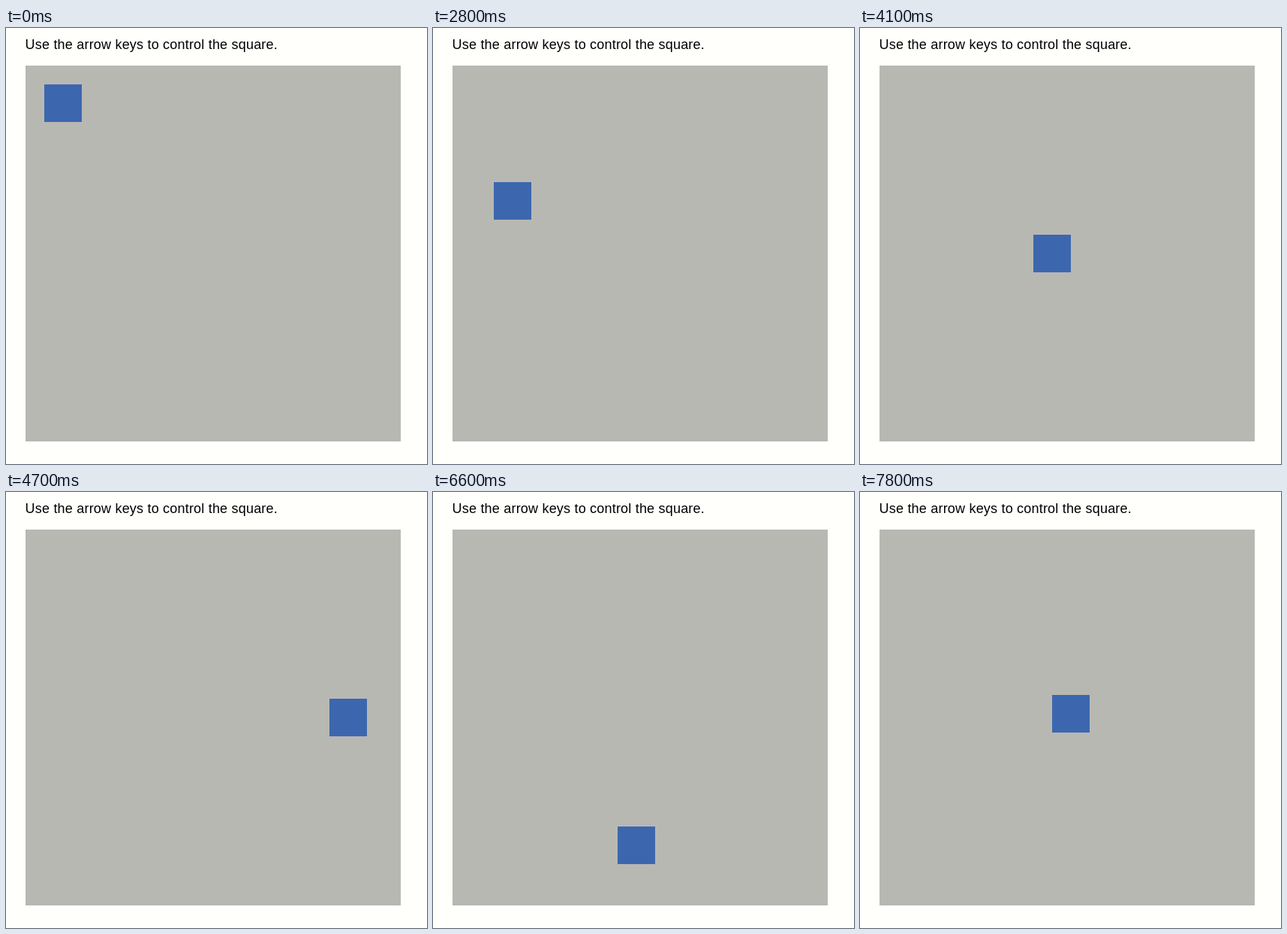
An HTML page that plays this animation: 561x580 px, repeating every 8 s.

```html
<!DOCTYPE html>
<html lang="en">
<head>
<meta charset="utf-8">
<title>Arrow key square</title>
<style>
  html, body { margin: 0; width: 100%; height: 100%; overflow: hidden; background: #fffffc; }
  svg { display: block; }
  text { font: 18px "Liberation Sans", Arial, sans-serif; letter-spacing: 0.2px; fill: #000; }
</style>
</head>
<body>
<svg width="561" height="580" viewBox="0 0 561 580">
  <text x="25.6" y="28">Use the arrow keys to control the square.</text>
  <svg x="26" y="50" width="500" height="500">
    <rect width="500" height="500" fill="#b8b8b3"/>
    <rect id="square" width="50" height="50" fill="#3c67ae"/>
  </svg>
</svg>
<script>
  const LOOP = 8000, STEP = 100;
  const square = document.getElementById("square");
  const poses = [];
  let x = 25, y = 25;

  const pose = (t) => poses.push({ t, x, y });
  const moveTo = (t, nx, ny) => { x = nx; y = ny; pose(t); };
  // One position per step along a single axis while a key is held.
  const holdX = (t, xs) => xs.forEach((v, i) => moveTo(t + i * STEP, v, y));
  const holdY = (t, ys) => ys.forEach((v, i) => moveTo(t + i * STEP, x, v));

  pose(0);
  moveTo(1400, 45, 25);
  moveTo(1800, 55, 25);
  moveTo(2300, 55, 35);
  holdY(2500, [65, 95, 125, 155, 185, 215]);
  moveTo(3200, 65, 225);
  holdX(3700, [85, 115, 145, 175, 205, 245, 275, 315, 355, 385, 405, 445, 485]);
  // Re-enters from the left edge.
  holdX(5000, [20, 50, 80, 110, 140, 170, 200, 220]);
  moveTo(5800, 220, 235);
  holdY(6200, [265, 295, 335, 365, 395, 425]);
  holdY(7000, [465, 495]);
  // Re-enters from the top edge.
  holdY(7200, [60, 100, 140, 170, 210]);
  moveTo(7800, 230, 220);

  const start = performance.now();
  function draw() {
    const t = (performance.now() - start) % LOOP;
    const now = poses.findLast((p) => p.t <= t);
    square.setAttribute("x", now.x);
    square.setAttribute("y", now.y);
    requestAnimationFrame(draw);
  }
  draw();
</script>
</body>
</html>
```
